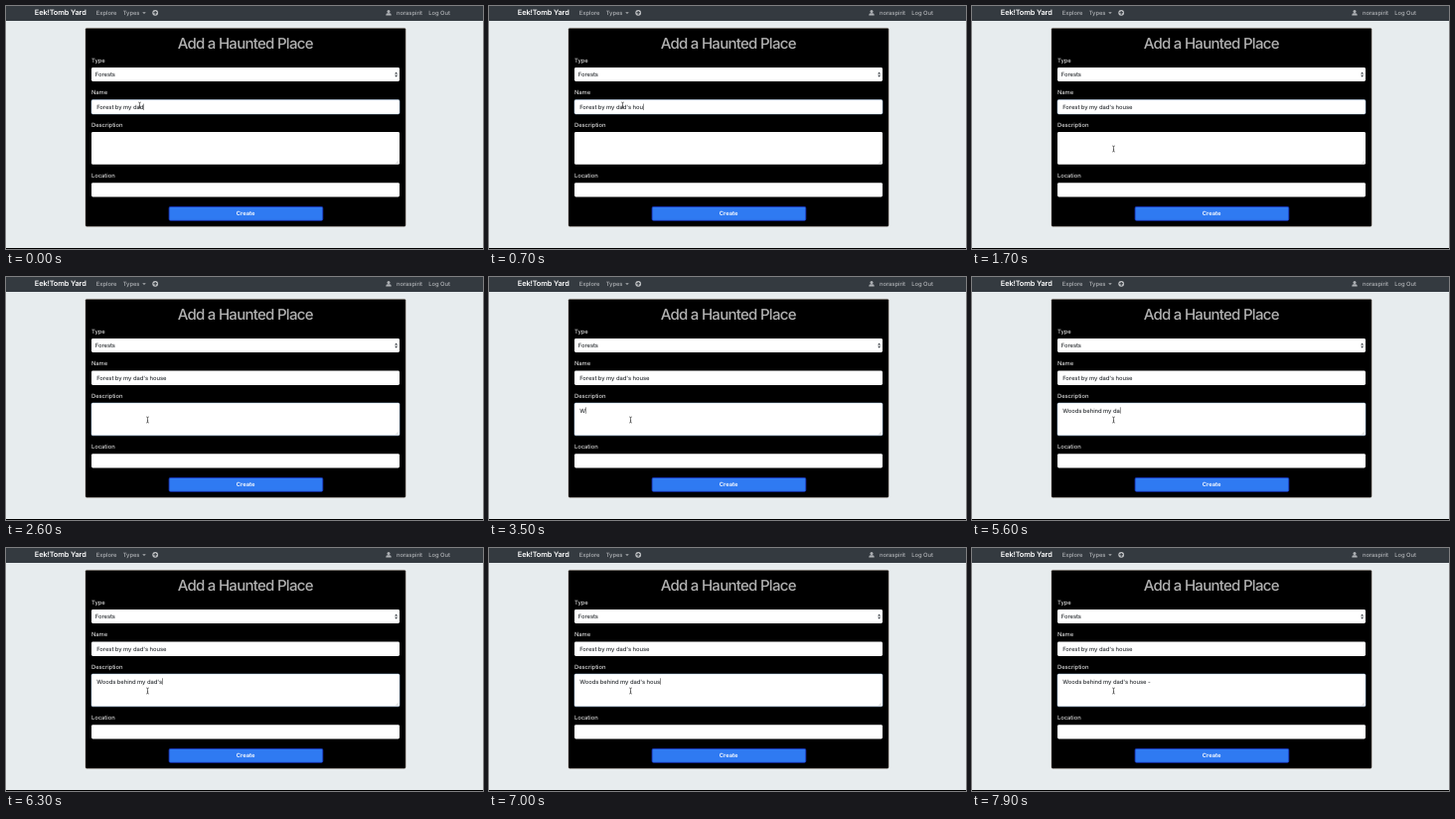
Recreate the animation shown at these times as an HTML page. Size 480x245 px, loop 8 s.

```html
<!DOCTYPE html>
<html lang="en">
<head>
<meta charset="utf-8">
<title>Add a Haunted Place</title>
<style>
  html, body { margin: 0; width: 100%; height: 100%; overflow: hidden; background: #e7ecee; }
  svg { display: block; width: 100vw; height: 100vh; }
  text {
    font: 500 5.85px Inter, Roboto, sans-serif;
    letter-spacing: -.06px;
    white-space: pre;
    text-rendering: geometricPrecision;
  }
  .brand { font-size: 7.4px; font-weight: 600; letter-spacing: -.13px; fill: #fff; }
  .nav { fill: #b0b3b6; }
  .title { font-size: 15px; letter-spacing: -.72px; fill: #b2b2b2; }
  .label { fill: #d8d8d8; }
  .value { fill: #2b2f33; }
  .button { fill: #fff; font-weight: 600; }
  .mid { text-anchor: middle; }
  .field { fill: #fff; }
  .focus { stroke: #bcdcff; stroke-width: .5; }
</style>
</head>
<body>
<svg viewBox="0 0 480 245" preserveAspectRatio="none">
  <rect width="480" height="245" fill="#e7ecee"/>
  <rect width="480" height="15" fill="#343a40"/>
  <rect y="244" width="480" height="1"/>

  <text class="brand" x="28.8" y="9.4">Eek!Tomb Yard</text>
  <g class="nav">
    <text x="90.8" y="9.1">Explore</text>
    <text x="117.7" y="9.1">Types</text>
    <path d="M137.2 6.2h3.6l-1.8 1.9z"/>
    <circle cx="150.2" cy="6.8" r="2.9" fill="#c3c5c7"/>
    <path d="M148.3 6.8h3.8M150.2 4.9v3.8" stroke="#343a40" stroke-width="1.1"/>
    <circle cx="385" cy="5.4" r="1.5"/>
    <path d="M382.3 9.6v-.7q0-1.7 1.7-1.7h2q1.7 0 1.7 1.7v.7z"/>
    <text x="393" y="9.1">noraspirit</text>
    <text x="425.3" y="9.1">Log Out</text>
  </g>

  <rect x="80" y="22.4" width="322.1" height="199.8" rx="1.2" stroke="#6b5a4c" stroke-width=".4"/>
  <text class="title mid" x="240.7" y="43">Add a Haunted Place</text>
  <g class="label">
    <text x="86" y="56.6">Type</text>
    <text x="86" y="89.1">Name</text>
    <text x="86" y="122">Description</text>
    <text x="86" y="172.9">Location</text>
  </g>

  <rect class="field" x="86" y="62" width="310" height="14" rx="1.4"/>
  <rect class="field" id="name" x="86" y="94.6" width="310" height="14.3" rx="1.4"/>
  <rect class="field" id="desc" x="86" y="127" width="310" height="32.8" rx="1.4"/>
  <rect class="field" x="86" y="178.2" width="310" height="14.3" rx="1.4"/>
  <path d="M391.2 68.6l1.4-2.1 1.4 2.1zM391.2 69.7l1.4 2.1 1.4-2.1z" fill="#343a40"/>
  <path d="M392.6 158.7l2.3-2.3M394 158.7l.9-.9" stroke="#888" stroke-width=".4"/>

  <text class="value" x="89.8" y="71.3">Forests</text>
  <text class="value" id="nameText" x="91.2" y="104"></text>
  <text class="value" id="descText" x="91.2" y="136.7"></text>
  <rect id="caret" width=".5" height="6.4" fill="#222"/>

  <rect x="164.1" y="202.4" width="154.7" height="13.9" rx="1.4" fill="#2f7af2" stroke="#1a34c4" stroke-width=".8"/>
  <text class="button mid" x="241.1" y="211.2">Create</text>

  <path id="mouse" d="M-1.3-3Q0-3 0-2.2Q0-3 1.3-3M0-2.2V2.2M-1.3 3Q0 3 0 2.2Q0 3 1.3 3M-.7.9H.7"
        fill="none" stroke="#222" stroke-width=".6"/>
</svg>
<script>
  const LOOP = 8000, STEP = 100;
  const el = id => document.getElementById(id);
  const name = "Forest by my dad's house";
  const desc = "Woods behind my dad's house -";

  // Bursts of typing: [start ms, end ms, letters before, letters after]
  const nameKeys = [[100, 900, 16, 24]];
  const descKeys = [
    [3300, 3400, 0, 1], [3600, 4000, 1, 5], [4200, 4500, 5, 7],
    [4600, 5600, 7, 18], [5700, 7000, 18, 26], [7100, 7900, 26, 29]
  ];
  const caretOff = [[1100, 1300], [1600, 2000], [2500, 2900], [7900, 8000]];

  function typed(text, keys, t) {
    let n = keys[0][2];
    for (const [a, b, from, to] of keys) {
      if (t >= a) n = from + Math.floor((to - from) * Math.min(1, (t - a) / (b - a)) + 1e-6);
    }
    return text.slice(0, n);
  }

  function draw(now) {
    const t = Math.floor(now % LOOP / STEP) * STEP;
    const inDesc = t >= 2000;
    el("nameText").textContent = typed(name, nameKeys, t);
    el("descText").textContent = typed(desc, descKeys, t);
    el("name").classList.toggle("focus", !inDesc);
    el("desc").classList.toggle("focus", inDesc);

    const line = el(inDesc ? "descText" : "nameText");
    const width = line.textContent ? line.getComputedTextLength() : 0;
    const caret = el("caret");
    caret.setAttribute("x", 91.4 + width);
    caret.setAttribute("y", inDesc ? 131.3 : 98.6);
    caret.setAttribute("opacity", caretOff.some(([a, b]) => t >= a && t < b) ? 0 : 1);

    const p = Math.max(0, Math.min(1, (t - 1000) / 600));
    const ease = p * p * (3 - 2 * p);
    el("mouse").setAttribute("transform", `translate(${134.5 + 8 * ease} ${100 + 44 * ease})`);
  }

  function tick() {
    draw(performance.now());
    requestAnimationFrame(tick);
  }
  tick();
</script>
</body>
</html>
```
